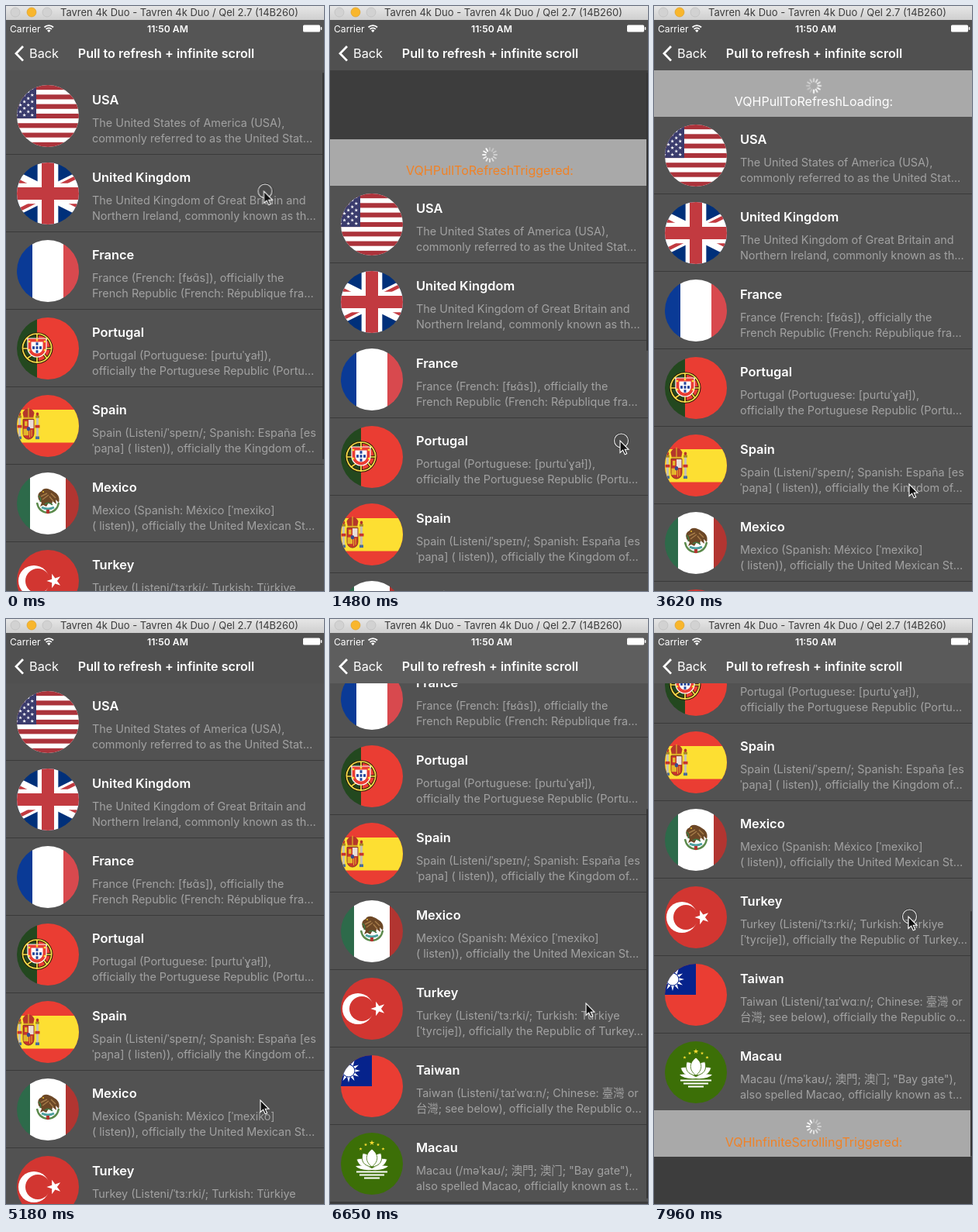
Write an HTML page that moves like this. It is 410x755 px and loops after 8000 ms.

```html
<!DOCTYPE html>
<html lang="en">
<head>
<meta charset="utf-8">
<title>Pull to refresh</title>
<style>
html, body { margin: 0; width: 100%; height: 100%; overflow: hidden; background: #3d3d3d; }
svg { display: block; font-family: Inter, "Noto Sans CJK SC", "Noto Sans", sans-serif; }
.name { font-size: 16.4px; font-weight: 600; fill: #fff; }
.desc { font-size: 14.4px; fill: #a2a2a2; }
.label { font-size: 16px; text-anchor: middle; fill: #fff; }
.hot { fill: #f08226; }

.anim { animation: 8s linear infinite; }
#back { animation-name: back; }
#nav { animation-name: nav; }
#list { animation-name: scroll; }
#pull { animation-name: pull; }
#more { animation-name: more; }
#triggered { animation-name: triggered; }
#loading { animation-name: loading; }
#spin { animation-name: spin; }
#bar { animation-name: bar; }
#cursor { animation-name: cursor; }
#ring { animation-name: ring; animation-timing-function: step-end; }
#triggered, #loading { animation-timing-function: step-end; }

@keyframes back {
  0%, .375% { fill: #525252; }
  2%, 100% { fill: #3d3d3d; }
}
@keyframes nav {
  0%, .375% { fill: #555; }
  4%, 70% { fill: #505050; }
  73%, 85% { fill: #5e5e5e; }
  100% { fill: #5a5a5a; }
}
@keyframes scroll {
  0%, .375% { transform: translateY(92px); }
  6.625%, 10.375% { transform: translateY(180px); }
  18.5% { transform: translateY(232px); }
  24.75% { transform: translateY(232px); animation-timing-function: ease-out; }
  30% { transform: translateY(143px); }
  56% { transform: translateY(143px); animation-timing-function: ease-in-out; }
  61% { transform: translateY(83px); }
  70% { transform: translateY(83px); }
  73% { transform: translateY(-48px); animation-timing-function: ease-out; }
  76.125% { transform: translateY(-142px); animation-timing-function: ease-out; }
  79.5%, 84.75% { transform: translateY(-147px); }
  89.625%, 90.75% { transform: translateY(-213px); }
  99.5%, 100% { transform: translateY(-265px); }
}
@keyframes pull {
  0%, .375% { opacity: 0; }
  4.5%, 56% { opacity: 1; }
  61%, 100% { opacity: 0; }
}
@keyframes more {
  0%, 84.75% { opacity: 0; }
  88.5%, 100% { opacity: 1; }
}
@keyframes triggered {
  0% { opacity: 1; }
  24.75%, 100% { opacity: 0; }
}
@keyframes loading {
  0% { opacity: 0; }
  24.75%, 100% { opacity: 1; }
}
@keyframes spin {
  0% { transform: rotate(0deg); }
  24.75% { transform: rotate(0deg); animation-timing-function: steps(31); }
  57%, 100% { transform: rotate(930deg); }
}
@keyframes bar {
  0%, .375% { y: 86px; height: 499px; opacity: 1; }
  6.625%, 10.375% { y: 86px; height: 411px; }
  18.5% { y: 86px; height: 359px; }
  24.75% { y: 86px; height: 359px; animation-timing-function: ease-out; }
  30% { y: 86px; height: 448px; opacity: 1; }
  34% { opacity: 0; }
  70% { y: 86px; height: 499px; opacity: 0; }
  70.6% { opacity: 1; }
  73% { y: 176px; height: 499px; }
  76.125% { y: 241px; height: 499px; }
  79.5%, 84.75% { y: 245px; height: 503px; }
  89.625%, 90.75% { y: 319px; height: 399px; }
  99.5%, 100% { y: 377px; height: 317px; opacity: 1; }
}
@keyframes cursor {
  0%, .375% { transform: translate(332.5px, 239px); }
  6.625%, 10.375% { transform: translate(363px, 422px); }
  18.5% { transform: translate(374px, 561px); }
  35.375% { transform: translate(374px, 561px); animation-timing-function: ease-in-out; }
  45.25%, 45.875% { transform: translate(329px, 617px); }
  54.875%, 70% { transform: translate(328px, 621px); }
  73% { transform: translate(324px, 488px); animation-timing-function: ease-out; }
  76.125%, 80.625% { transform: translate(322px, 385px); }
  83.125% { transform: translate(330px, 495px); }
  84.75% { transform: translate(331px, 612px); }
  89.625%, 90.75% { transform: translate(330px, 480px); }
  99.5%, 100% { transform: translate(328px, 384px); }
}
@keyframes ring {
  0% { opacity: 1; }
  24.9% { opacity: 0; }
  70% { opacity: 1; }
  74.6% { opacity: 0; }
  84.75%, 100% { opacity: 1; }
}
</style>
</head>
<body>
<svg width="410" height="755" viewBox="0 0 410 755">
  <defs>
    <clipPath id="disc"><circle cx="40" cy="40" r="40"/></clipPath>
    <linearGradient id="chrome" x2="0" y2="1">
      <stop stop-color="#e6e6e6"/><stop offset="1" stop-color="#cfcfcf"/>
    </linearGradient>
    <g id="petals"></g>
  </defs>

  <rect id="back" class="anim" y="83" width="410" height="672"/>

  <g id="list" class="anim">
    <g id="pull" class="anim">
      <rect y="-60" width="410" height="60" fill="#a9a9a9"/>
      <g transform="translate(206 -40)"><g id="spin" class="anim"><use href="#petals"/></g></g>
      <text id="triggered" class="label hot anim" x="206" y="-14">VQHPullToRefreshTriggered:</text>
      <text id="loading" class="label anim" x="206" y="-14">VQHPullToRefreshLoading:</text>
    </g>
    <g id="rows"></g>
    <g id="more" class="anim">
      <rect y="899" width="410" height="60" fill="#a9a9a9"/>
      <use href="#petals" x="206" y="920"/>
      <text class="label hot" x="206" y="946">VQHInfiniteScrollingTriggered:</text>
    </g>
  </g>
  <rect id="bar" class="anim" x="408" width="2" rx="1" fill="#343434"/>

  <g fill="#fff">
    <rect id="nav" class="anim" y="18" width="410" height="65"/>
    <rect width="410" height="18" fill="url(#chrome)"/>
    <g stroke="#b9b9b9" stroke-width=".6">
      <circle cx="12" cy="8" r="6" fill="#d2d2d2"/>
      <circle cx="33" cy="8" r="6" fill="#f8b62d" stroke="#d99a24"/>
      <circle cx="53" cy="8" r="6" fill="#d2d2d2"/>
    </g>
    <text x="223.5" y="13" font-size="13" text-anchor="middle" fill="#3c3c3c">Tavren 4k Duo - Tavren 4k Duo / Qel 2.7 (14B260)</text>
    <text x="5" y="33.5" font-size="12.1">Carrier</text>
    <g fill="none" stroke="#fff" stroke-width="1.8">
      <path d="M49.5 27.5a8 8 0 0 1 11.5 0M51.6 30a5 5 0 0 1 7.3 0"/>
      <path d="M55.25 34l-2.2-2.3a3 3 0 0 1 4.4 0z" fill="#fff" stroke="none"/>
    </g>
    <text x="208.5" y="33.8" font-size="12.2" font-weight="600" text-anchor="middle">11:50 AM</text>
    <rect x="383" y="24.5" width="22" height="9" rx="1.5"/>
    <rect x="405.7" y="27" width="1.6" height="4" rx=".8"/>
    <path d="M22 52l-9 9.3 9 9.3" fill="none" stroke="#fff" stroke-width="2.8"/>
    <text x="30" y="67" font-size="16.3">Back</text>
    <text x="206.5" y="67" font-size="16.1" font-weight="600" text-anchor="middle">Pull to refresh + infinite scroll</text>
  </g>

  <g id="cursor" class="anim">
    <g id="ring" class="anim" fill="none">
      <circle cx="1.5" r="10" stroke="#2c2c2c" stroke-width=".8"/>
      <circle cx="1.5" r="9" fill="#000" fill-opacity=".08" stroke="#e8e8e8" stroke-width="1.1"/>
    </g>
    <path d="M0 0V15.5L3.6 12.2 6.2 17.8 8.7 16.7 6.2 11.3H11Z" fill="#111" stroke="#fff" stroke-width="1.1"/>
  </g>
</svg>
<script>
const rect = (x, y, w, h, fill) => `<rect x="${x}" y="${y}" width="${w}" height="${h}" fill="${fill}"/>`;
const circle = (x, y, r, fill) => `<circle cx="${x}" cy="${y}" r="${r}" fill="${fill}"/>`;
const path = (d, fill, extra = '') => `<path d="${d}" fill="${fill}" ${extra}/>`;
const line = (d, color, width) => path(d, 'none', `stroke="${color}" stroke-width="${width}"`);
const group = (transform, body) => `<g transform="${transform}">${body}</g>`;
const times = (n, fn) => Array.from({ length: n }, (_, i) => fn(i)).join('');

// Star polygon with n points; inner is the ratio of the inner radius.
function star(x, y, r, fill, n = 5, inner = .38, turn = -Math.PI / 2) {
  let pts = '';
  for (let i = 0; i < n * 2; i++) {
    const a = turn + i * Math.PI / n, q = i % 2 ? r * inner : r;
    pts += `${(x + q * Math.cos(a)).toFixed(2)},${(y + q * Math.sin(a)).toFixed(2)} `;
  }
  return `<polygon points="${pts}" fill="${fill}"/>`;
}

const RED = '#ea3d33', YELLOW = '#fddf32';

const flags = {
  usa() {
    const stripe = 80 / 13;
    let s = rect(0, 0, 80, 80, '#fff') + times(7, i => rect(0, i * 2 * stripe, 80, stripe, '#ab333b'));
    s += rect(0, 0, 25, stripe * 7, '#3b3c6d');
    for (let j = 1; j < 10; j++)
      for (let k = 7; k < 12; k++)
        if (j % 2 === k % 2) s += star(-36 + 5.07 * k, 4.3 * j, 2.5, '#fff');
    return s;
  },
  uk() {
    return rect(0, 0, 80, 80, '#00307a')
      + line('M-40 0L120 80M-40 80L120 0', '#fff', 16)
      + line('M-40 2.7L40 42.7M40 37.3L120 77.3M-40 82.7L40 42.7M40 37.3L120 -2.7', '#c23a40', 4.5)
      + line('M40 0V80M0 40H80', '#fff', 26.7) + line('M40 0V80M0 40H80', '#c23a40', 16);
  },
  france() {
    return rect(0, 0, 20, 80, '#0a3a96') + rect(20, 0, 40, 80, '#fff') + rect(60, 0, 20, 80, '#d8494e');
  },
  portugal() {
    const shield = (w, h) => `M${26 - w} ${39 - h}h${2 * w}v${h}a${w} ${w} 0 0 1 ${-2 * w} 0z`;
    const sphere = 'M26 21a18.5 18.5 0 1 0 .1 0M8 40H45M26 21V59M13 27Q26 34 39 53M13 53Q26 46 39 27';
    return rect(0, 0, 26, 80, '#23481f') + rect(26, 0, 54, 80, RED)
      + line(sphere, '#2b1d08', 3.6) + line(sphere, '#f6e04a', 1.7)
      + path(shield(12, 12), RED, 'stroke="#fff" stroke-width="1.2"')
      + path(shield(7.5, 7.5), '#fff')
      + [[26, 34], [26, 39], [26, 44], [21.5, 39], [30.5, 39]].map(p => rect(p[0] - 1.5, p[1] - 1.8, 3, 3.6, '#24449a')).join('')
      + [[16, 31], [26, 29], [36, 31], [16, 42], [36, 42]].map(p => rect(p[0] - 1.2, p[1] - 1.2, 2.4, 2.4, YELLOW)).join('');
  },
  spain() {
    const pillar = x => rect(x, 32, 3, 20, '#c9c2b0') + rect(x - 1, 30, 5, 2.5, '#a98a22')
      + rect(x - 1, 52, 5, 3, '#4a6d9a') + rect(x - 1.5, 40, 6, 3, '#c8352c') + circle(x + 1.5, 28.5, 1.8, '#b4372b');
    const arms = pillar(3) + pillar(26)
      + path('M9 34h14v15a7 6 0 0 1-14 0z', '#c8352c', 'stroke="#7d3020" stroke-width=".8"')
      + rect(16, 34.5, 6.5, 9, '#eadfd8') + rect(9.5, 44, 6.5, 7, '#e3b62c') + rect(11, 36, 3.5, 5, '#e3b62c')
      + line('M17.5 45v8M20 45v7', '#e3b62c', 1) + circle(16, 44, 2.2, '#3b4a8c')
      + path('M10 33l-1.5-6q3.5-5 7.5-4 4-1 7.5 4L22 33z', '#b4372b') + line('M9.5 32.5h13M16 22v10', '#d8a526', 1.4);
    return rect(0, 0, 80, 80, RED) + rect(0, 19, 80, 42.5, YELLOW)
      + group('translate(-1 -10) scale(1 1.22)', arms);
  },
  mexico() {
    const arms = line('M26 41q2 12 14 13 12-1 14-13', '#5c8a4c', 2.4)
      + line('M32 47q8 4 16 0', '#4ea0a0', 3) + rect(38, 50, 4, 5, '#b23531')
      + path('M28 37q-3-8 4-11 2-4 8-3l5 2 6 4q5 5 3 12l-4-4 1 6-5-4-1 5-4-3-3 5-4-2-4 2 2-5z', '#6c4726')
      + line('M31 33l8-4M33 37l8-6M44 29l6 6M42 33l5 6', '#a47a48', 1.5)
      + line('M28 32q4 4 2 8M36 43q5-4 10 1', '#3f7a45', 1.6) + circle(34, 27, 1.1, '#e3b62c');
    return rect(0, 0, 17, 80, '#2d6a4a') + rect(17, 0, 46, 80, '#fff') + rect(63, 0, 17, 80, '#b23531')
      + group('translate(0 -2)', arms);
  },
  turkey() {
    return rect(0, 0, 80, 80, '#d23631') + circle(22, 40, 20, '#fff') + circle(27, 40, 16, '#d23631')
      + star(48.2, 40, 9.8, '#fff', 5, .38, Math.PI);
  },
  taiwan() {
    return rect(0, 0, 80, 80, RED) + rect(0, 0, 40, 40, '#06238c')
      + star(10, 20, 15, '#fff', 12, .518) + circle(10, 20, 8.5, '#06238c') + circle(10, 20, 7.5, '#fff');
  },
  macau() {
    const petal = (a, h, w) => `<path d="M0 0C${-w} ${-h * .3} ${-w} ${-h * .7} 0 ${-h}C${w} ${-h * .7} ${w} ${-h * .3} 0 0" fill="#fff" stroke="#3c6f07" stroke-width=".8" transform="translate(40 44) rotate(${a})"/>`;
    return rect(0, 0, 80, 80, '#3c6f07')
      + [[40, 13, 3.6], [32, 15.5, 2.3], [48, 15.5, 2.3], [25.5, 21, 2.3], [54.5, 21, 2.3]].map(p => star(...p, YELLOW)).join('')
      + [-64, 64].map(a => petal(a, 22, 7)).join('') + [-34, 34].map(a => petal(a, 21, 8)).join('') + petal(0, 23, 9)
      + path('M19 43q11-2 21 3 10-5 21-3-5 6-21 5-16 1-21-5z', '#fff')
      + line('M20 50.5H60M24 54.5H56M30 58.5H50', '#fff', 2.2);
  }
};

const countries = [
  ['usa', 'USA', 'The United States of America (USA),', 'commonly referred to as the United Stat…'],
  ['uk', 'United Kingdom', 'The United Kingdom of Great Britain and', 'Northern Ireland, commonly known as th…'],
  ['france', 'France', 'France (French: [fʁɑ̃s]), officially the', 'French Republic (French: République fra…'],
  ['portugal', 'Portugal', 'Portugal (Portuguese: [puɾtuˈɣaɫ]),', 'officially the Portuguese Republic (Portu…'],
  ['spain', 'Spain', 'Spain (Listeni/ˈspeɪn/; Spanish: España [es', 'ˈpaɲa] ( listen)), officially the Kingdom of…'],
  ['mexico', 'Mexico', 'Mexico (Spanish: México [ˈmexiko]', '( listen)), officially the United Mexican St…'],
  ['turkey', 'Turkey', 'Turkey (Listeni/ˈtɜːrki/; Turkish: Türkiye', '[ˈtyɾcije]), officially the Republic of Turkey…'],
  ['taiwan', 'Taiwan', 'Taiwan (Listeni/ˌtaɪˈwɑːn/; Chinese: 臺灣 or', '台灣; see below), officially the Republic o…'],
  ['macau', 'Macau', 'Macau (/məˈkaʊ/; 澳門; 澳门; "Bay gate"),', 'also spelled Macao, officially known as t…']
];

document.getElementById('rows').innerHTML = countries.map(([flag, name, first, second], i) => `
  <g transform="translate(0 ${i * 100})">
    ${rect(0, 0, 410, 100, '#525252')}${rect(0, 99, 410, 1, '#3a3a3a')}
    <g transform="translate(14 10)" clip-path="url(#disc)">${flags[flag]()}</g>
    <text class="name" x="111" y="35">${name}</text>
    <text class="desc" x="111" y="64">${first}</text>
    <text class="desc" x="111" y="84">${second}</text>
  </g>`).join('');

document.getElementById('petals').innerHTML = times(12, i =>
  `<rect x="-1" y="-10" width="2" height="5.5" rx="1" fill="#fff" opacity="${(.25 + .75 * i / 11).toFixed(2)}" transform="rotate(${i * 30})"/>`);
</script>
</body>
</html>
```
